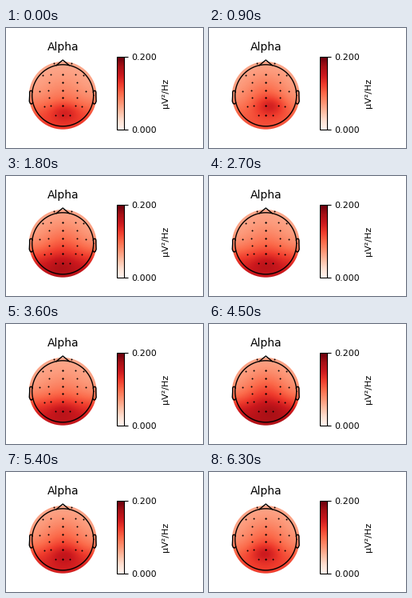
A matplotlib script that plays this animation: 247x150 px, repeating every 7.2 s.

```python
import numpy as np
import matplotlib.pyplot as plt
from matplotlib.animation import FuncAnimation
from matplotlib.patches import Circle

W, H, DPI = 247, 150, 100
CX, CY = 71.2, 84.3
CLIP_R = 42.4
HEAD_R = 38.5
RES = 64
FRONT = .30

# One state per step: central warmth, level at the back, peak x and y
STATES = [
    (.09, .63, .05, -.50),
    (.17, .56, .15, -.31),
    (.15, .79, -.05, -.70),
    (.11, .76, .00, -.62),
    (.09, .78, .00, -.58),
    (.20, .83, .20, -.55),
    (.16, .72, .05, -.45),
    (.17, .61, -.05, -.40),
]

x, y = np.meshgrid(np.linspace(-1, 1, RES), np.linspace(1, -1, RES))


def blob(px, py, sx, sy):
    return np.exp(-((x - px) / sx) ** 2 - ((y - py) / sy) ** 2)


def scalp(core, back, px, py):
    """Front-to-back rise, warm centre and one peak that stands out less on a hot back."""
    rise = 1 / (1 + np.exp((y + .3) / .22))
    level = FRONT + (back - FRONT) * rise + core * blob(0, 0, .65, .65)
    level += .4 * (.95 - back) * blob(px, py, .42, .28)
    return .2 * np.clip(level, 0, 1)


maps = [scalp(*state) for state in STATES]

plt.rcParams["font.family"] = "DejaVu Sans"
fig = plt.figure(figsize=(W / DPI, H / DPI), dpi=DPI, facecolor="white")
ax = fig.add_axes([0, 0, 1, 1])
ax.axis("off")

image = ax.imshow(
    maps[0], cmap="Reds", vmin=0, vmax=.2, interpolation="bilinear",
    extent=(CX - CLIP_R, CX + CLIP_R, CY + CLIP_R, CY - CLIP_R))
ax.set(xlim=(0, W), ylim=(H, 0), aspect="auto")
image.set_clip_path(Circle((CX, CY), CLIP_R, transform=ax.transData))


def outline(px, py):
    ax.plot(CX + HEAD_R * np.asarray(px), CY - HEAD_R * np.asarray(py),
            color="black", lw=1, solid_joinstyle="round")


t = np.linspace(0, 2 * np.pi, 101)
outline(np.cos(t), np.sin(t))
nose = np.radians(12)
base = np.sqrt(1 - nose ** 2)
outline([-nose, 0, nose], [base, 1.15, base])
ear_x = np.array([.99, 1.02, 1.06, 1.08, 1.08, 1.09, 1.06, 1.02, .98])
ear_y = np.array([.11, .155, .15, .11, -.01, -.19, -.26, -.28, -.24])
for side in (-1, 1):
    outline(side * ear_x, ear_y)

# Sensors mirror about the midline; rows sag slightly towards the sides
five, three = (0, 15.4, 25.5), (0, 17.6)
rows = {43.8: (10.8,), 57.8: five, 67.8: three, 77.8: (0, 17.9, 29),
        86.6: three, 96.8: (0, 15.4, 23.6), 108.8: (0, 9.2)}
for row, offsets in rows.items():
    for dx in offsets:
        sag = dx ** 2 / 700
        ax.plot([CX - dx, CX + dx], [row + sag] * 2, "ko", ms=1.4, mew=0)

ax.text(71.5, 28, "Alpha", size=10, ha="center", va="baseline")

cax = fig.add_axes([138.8 / W, 1 - 127.3 / H, 9.1 / W, 91 / H])
bar = fig.colorbar(image, cax=cax, ticks=[0, .2], format="%.3f")
bar.ax.tick_params(labelsize=8)
bar.set_label("µV²/Hz", size=8)


def update(i):
    image.set_data(maps[i])
    return [image]


anim = FuncAnimation(fig, update, frames=len(maps), interval=900,
                     repeat=True, repeat_delay=0)
plt.show()
```
